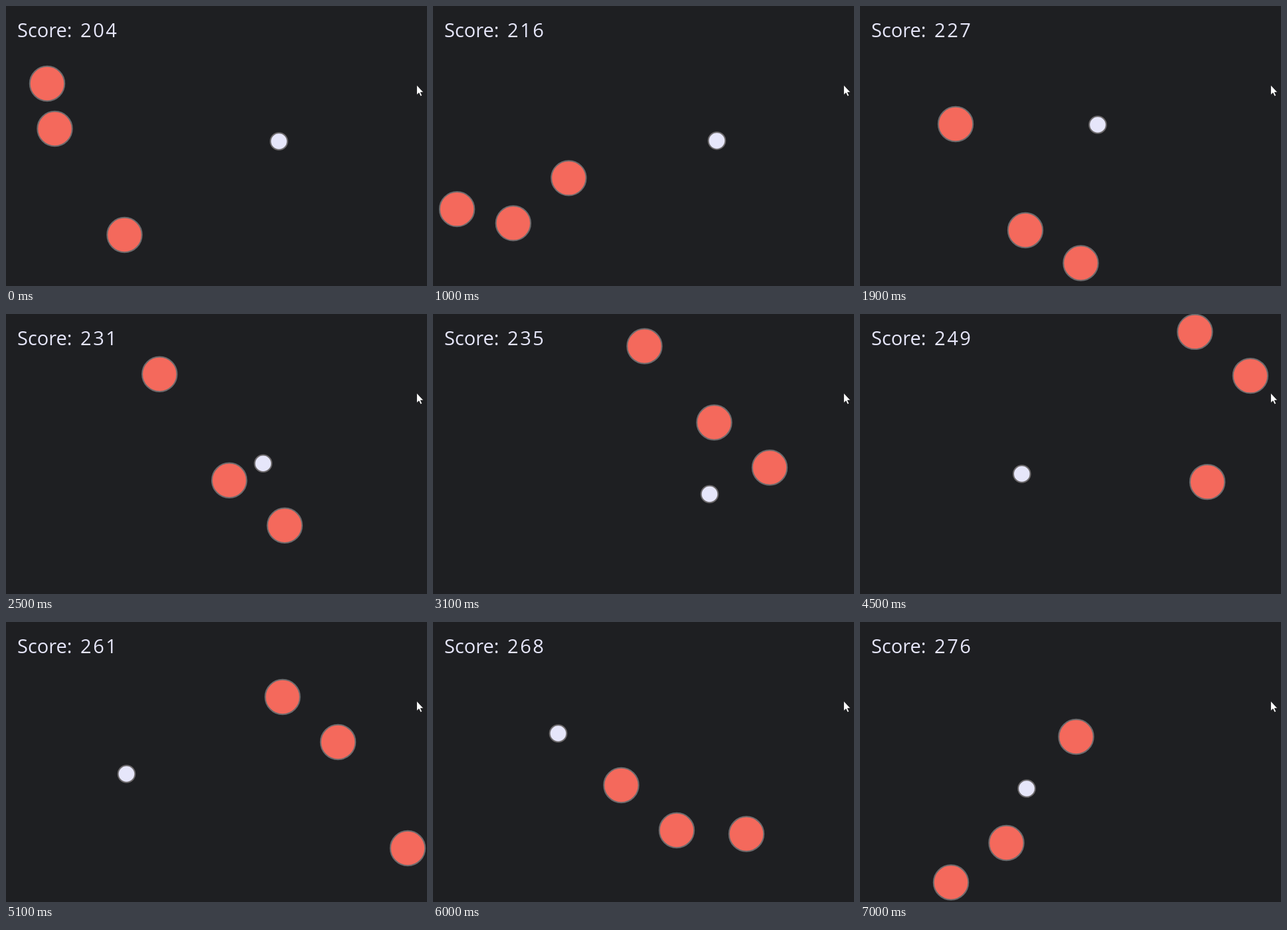
An HTML page for the animation above (7.1 s loop, 634 by 422 pixels).

```html
<!DOCTYPE html>
<html lang="en">
<head>
<meta charset="utf-8">
<title>Dodge game</title>
<style>
  html, body { margin: 0; width: 100%; height: 100%; overflow: hidden; background: #1e1f22; }
  svg { display: block; width: 634px; height: 422px; }
  text { font: 29px "Open Sans", sans-serif; fill: #e6e6fa; }
  #score { letter-spacing: 2.6px; }
  circle { stroke: #6d6a6c; stroke-width: 2; }
  .enemy { fill: #f4695c; }
  #player { fill: #e6e6fa; }
</style>
</head>
<body>
<svg viewBox="0 0 634 422">
  <rect width="634" height="422" fill="#1e1f22"/>
  <text x="17" y="46.5">Score:</text>
  <text id="score" x="112" y="46.5"></text>
  <circle id="player" r="12.8"/>
  <circle class="enemy" r="26.2"/>
  <circle class="enemy" r="26.2"/>
  <circle class="enemy" r="26.2"/>
  <path d="M618.5 119v15l3.4-3.1 2.3 5.2 2.4-1-2.3-5h4.4z" fill="#fff" stroke="#101114" stroke-width=".7"/>
</svg>
<script>
const LOOP = 7100, STEP = 100;
const BOX = { left: 26, right: 608, top: 26, bottom: 396.75 };

// [time, value...] keys, linear in between
const travel = [[0, 0], [1900, 270.5], [3100, 445], [3900, 561.7], [5100, 737.5], [6000, 870.5], [7000, 1017]];
const points = [[0, 204], [1900, 227], [3100, 235], [3900, 237], [5100, 261], [5600, 268], [6400, 268], [7000, 276]];
const path = [[0, 411, 204], [800, 411, 204], [1250, 448, 202], [1900, 358, 179], [3100, 416.5, 271.5],
  [3200, 406, 271.5], [3900, 306, 253], [5100, 181.5, 229], [6000, 188.5, 168], [7000, 251, 251]];

// start position and horizontal direction; all start downwards
const starts = [[62, 117, 1], [73.5, 185, -1], [178.5, 345, -1]];

const enemies = document.querySelectorAll('.enemy');
const player = document.getElementById('player');
const score = document.getElementById('score');

function at(keys, t, col = 1) {
  let i = 1;
  while (i < keys.length - 1 && t > keys[i][0]) i++;
  const a = keys[i - 1], b = keys[i];
  return a[col] + (b[col] - a[col]) * (t - a[0]) / (b[0] - a[0]);
}

function bounce(v, min, max) {
  const span = max - min, period = 2 * span;
  const p = ((v - min) % period + period) % period;
  return min + (p > span ? period - p : p);
}

function place(el, x, y) {
  el.setAttribute('cx', x.toFixed(2));
  el.setAttribute('cy', y.toFixed(2));
}

function draw(now) {
  const t = Math.floor(now % LOOP / STEP) * STEP;
  const d = at(travel, t);
  starts.forEach(([x, y, dir], i) => place(enemies[i],
    bounce(x + dir * d, BOX.left, BOX.right),
    bounce(y + d, BOX.top, BOX.bottom)));
  place(player, at(path, t, 1), at(path, t, 2));
  score.textContent = Math.floor(at(points, t) + 1e-6);
}

const begin = performance.now();
function tick() {
  draw(performance.now() - begin);
  requestAnimationFrame(tick);
}
tick();
</script>
</body>
</html>
```
